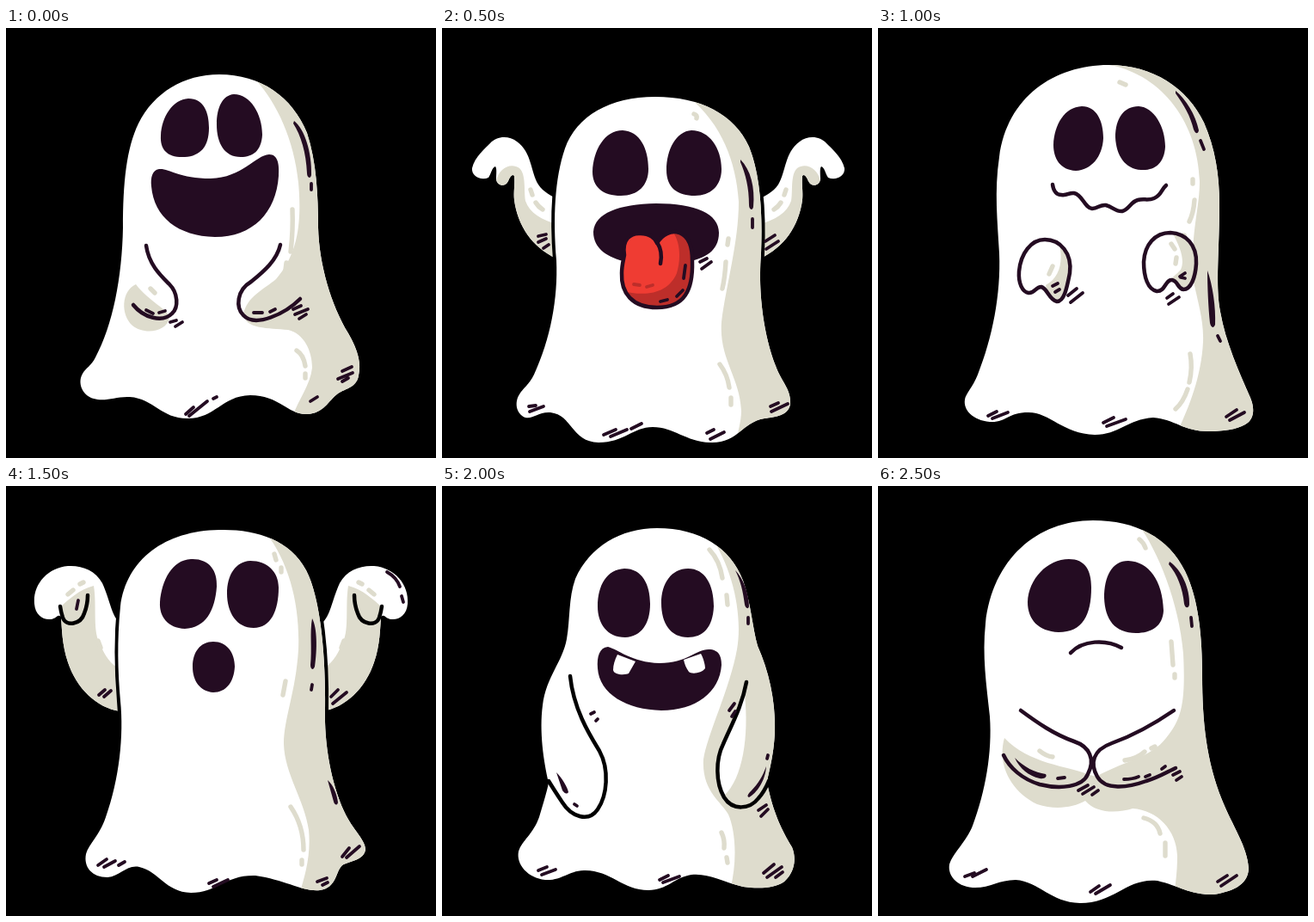
Write an HTML page that moves like this. It is 500 by 500 pixels and loops after 3000 ms.

```html
<!DOCTYPE html>
<html lang="en">
<head>
<meta charset="utf-8">
<title>Ghost moods</title>
<style>
html, body { margin: 0; width: 100%; height: 100%; overflow: hidden; background: #000; }
svg { display: block; width: 100vw; height: 100vh; }
.pose { visibility: hidden; animation: show 3s step-end infinite; animation-delay: calc(var(--i) * .5s - 3s); }
@keyframes show {
  0% { visibility: visible; }
  16.666%, 100% { visibility: hidden; }
}
.w { fill: #fff; }
.s { fill: #dedccd; }
.k { fill: #240c22; }
.d, .l, .a, .h { fill: none; stroke-linecap: round; stroke-linejoin: round; }
.d { stroke: #240c22; stroke-width: 3.8; }
.l { stroke: #dedccd; stroke-width: 5.4; }
.a { stroke: #240c22; stroke-width: 4.5; }
.h { stroke: #000; stroke-width: 4.5; }
.edge { stroke: #000; stroke-width: 8; paint-order: stroke; }
</style>
</head>
<body>
<svg viewBox="0 0 500 500">
<defs>
  <path id="b0" d="M248 54C296 54 333 80 350 122C361 155 363 195 363 232C364 275 378 322 398 355C410 376 413 390 410 404C408 418 395 419 386 425C374 434 370 448 350 449C328 450 318 427 284 427C250 428 244 454 211 454C180 454 172 431 144 429C128 428 116 435 102 431C88 427 83 412 89 402C93 395 99 393 104 383C124 346 135 290 136 232C136 180 140 140 154 111C172 75 207 54 248 54Z"/>
  <path id="b1" d="M248 80C300 80 340 100 357 138C370 170 373 215 371 262C367 310 375 360 388 393C395 412 406 420 405 437C403 451 388 452 375 454C347 459 345 483 312 482C283 481 270 464 245 464C222 464 212 482 182 482C150 481 152 450 126 447C112 446 106 455 97 453C86 449 84 435 90 426C94 419 101 415 107 403C126 362 135 315 133 270C129 220 131 175 143 140C157 102 195 80 248 80Z"/>
  <path id="b2" d="M268 43C320 43 360 70 379 110C392 140 397 170 397 205C397 260 392 300 398 330C404 365 420 400 433 430C438 442 438 455 427 461C417 467 400 469 385 469C355 469 345 455 320 453C290 455 280 473 252 473C215 472 200 447 175 447C150 447 150 459 130 458C110 456 99 444 101 432C102 425 110 418 116 403C133 360 143 310 141 262C139 225 135 190 141 150C150 80 205 43 268 43Z"/>
  <path id="b3" d="M248 51C290 50 330 62 349 98C366 130 372 200 371 260C370 300 378 345 393 378C403 400 418 411 418 423C416 435 400 436 391 441C383 448 385 467 365 470C345 472 325 458 290 453C255 452 245 473 215 473C185 472 178 448 155 443C140 440 133 454 118 455C100 455 90 443 93 428C97 415 108 408 116 385C132 340 137 290 133 250C130 215 129 180 133 140C140 85 185 52 248 51Z"/>
  <path id="b4" d="M250 49C300 49 336 72 350 110C359 135 361 165 367 186C380 215 388 250 387 285C386 315 379 335 378 345C385 380 395 400 407 420C413 435 409 450 398 460C385 469 365 468 350 466C325 460 310 450 290 452C270 455 262 470 240 470C210 470 195 446 165 447C145 448 140 459 120 458C100 456 86 440 89 425C93 412 106 405 113 385C119 365 122 355 124 345C118 320 113 285 117 255C121 222 140 205 145 178C149 155 147 130 155 108C172 70 208 49 250 49Z"/>
  <path id="b5" d="M250 40C300 40 338 60 357 99C373 132 377 175 377 220C377 275 382 320 400 365C412 395 430 420 431 445C430 465 410 472 390 475C365 476 350 465 325 459C290 455 275 485 235 485C200 484 188 460 160 458C140 458 130 468 110 467C90 465 81 452 83 440C88 425 102 415 110 395C125 355 133 310 130 268C126 230 121 198 125 160C133 85 185 40 250 40Z"/>
  <path id="tongue" d="M212 264C209 246 219 238 231 239C241 239 248 244 250 250C256 240 266 235 276 238C288 243 291 255 291 271C292 305 282 325 250 325C221 325 208 308 209 285C209 276 211 270 212 264Z"/>
  <path id="handL" d="M194 246C178 246 166 262 164 283C163 297 168 307 175 308C182 309 183 301 190 301C197 303 199 316 208 318C217 318 220 300 223 285C226 262 212 246 194 246Z"/>
  <path id="handR" d="M340 238C322 238 310 252 309 272C309 290 314 304 324 306C334 307 334 292 342 293C349 294 348 303 355 304C364 304 369 290 370 274C371 252 358 239 340 238Z"/>
  <path id="arm1" d="M133 268C105 255 88 230 84 200C83 190 85 182 84 172C82 169 79 173 77 178C73 186 64 183 63 176C63 170 64 163 62 161C58 162 57 170 54 174C45 178 34 172 35 163C38 150 50 140 56 134C64 125 78 125 87 132C105 145 103 168 112 182C118 191 127 195 136 200Z"/>
  <path id="arm3" d="M133 160C122 150 122 135 112 113C104 98 88 92 72 93C48 95 31 115 33 137C34 150 43 156 52 155C59 154 60 148 64 152C65 165 65 185 72 205C82 235 105 258 133 262Z"/>
  <clipPath id="c0"><use href="#b0"/></clipPath>
  <clipPath id="c1"><use href="#b1"/></clipPath>
  <clipPath id="c2"><use href="#b2"/></clipPath>
  <clipPath id="c3"><use href="#b3"/></clipPath>
  <clipPath id="c4"><use href="#b4"/></clipPath>
  <clipPath id="c5"><use href="#b5"/></clipPath>
  <clipPath id="ct"><use href="#tongue"/></clipPath>
  <clipPath id="cl"><use href="#handL"/></clipPath>
  <clipPath id="cr"><use href="#handR"/></clipPath>
  <clipPath id="ca1"><use href="#arm1"/></clipPath>
  <clipPath id="ca3"><use href="#arm3"/></clipPath>
  <g id="raised">
    <use href="#arm1" class="w"/>
    <path class="s" clip-path="url(#ca1)" d="M63 178C66 163 80 156 90 163C98 170 95 190 97 201C102 215 115 223 136 229V270H63Z"/>
    <path class="l" d="M103 188L105 194M109 203Q112 208 117 211"/>
  </g>
  <g id="curled">
    <use href="#arm3" class="w"/>
    <path class="s" clip-path="url(#ca3)" d="M64 140C72 133 85 120 102 116C106 140 100 170 110 185C115 198 122 207 133 214V265H64Z"/>
    <path class="h" d="M63 140Q64 147 66 153C70 164 87 161 91 148Q95 138 95 127"/>
    <path class="l" d="M72 126L78 121M86 114L90 112M107 180L110 188"/>
  </g>
</defs>

<!-- laughing -->
<g class="pose" style="--i:0">
  <use href="#b0" class="w"/>
  <g class="s" clip-path="url(#c0)">
    <path d="M290 60C315 87 335 130 340 180C344 225 340 262 314 292C300 304 280 312 276 333C278 350 305 349 328 351C346 355 356 375 356 395C354 415 340 432 333 452H430V50Z"/>
    <path d="M151 298C134 306 133 333 147 346C160 357 187 354 190 337C190 328 166 318 151 298Z"/>
  </g>
  <path class="l" d="M333 211Q334 235 331 260M326 273L325 281M338 375Q346 380 348 393M348 402V407M168 303L173 308"/>
  <path class="k" d="M212 82C230 82 236 98 236 116C236 138 226 149 208 150C188 151 179 142 180 125C181 103 194 83 212 82ZM265 77C284 77 298 100 298 124C297 143 287 150 273 150C254 150 245 134 245 112C245 92 252 78 265 77ZM178 164C190 163 200 175 238 175C275 174 290 148 306 147C316 147 318 158 317 172C314 215 287 243 243 243C200 242 172 220 169 184C168 174 170 165 178 164ZM335 108C347 117 356 145 355 171C354 176 350 174 350 169C349 145 343 125 334 111Z"/>
  <path class="a" d="M163 253C166 275 180 288 190 298C200 308 201 325 193 332C182 343 160 337 148 322M319 252C315 270 300 283 285 295C268 305 267 325 276 334C290 349 325 332 342 315"/>
  <path class="d" d="M355 181V188M163 328L171 332M178 331L185 329M191 342L198 340M197 347L205 342M288 331H298M307 330L313 327M334 327L343 323M336 333L351 327M341 338L349 333M209 449L218 441M213 451L234 434M241 431L245 429M391 399L402 394M386 408L403 401M391 411L398 407M354 434L362 429"/>
</g>

<!-- tongue out -->
<g class="pose" style="--i:1">
  <use href="#raised"/>
  <use href="#raised" transform="matrix(-1 0 0 1 503 0)"/>
  <use href="#b1" class="w edge"/>
  <path class="s" clip-path="url(#c1)" d="M288 81C325 112 342 155 345 202C345 250 330 300 325 342C322 385 346 405 348 445C348 460 343 470 342 485H430V80Z"/>
  <path class="l" d="M293 100Q297 101 296 105M333 245L332 252M330 272Q329 290 326 303M323 391Q332 403 334 418M336 430L336 438"/>
  <path class="k" d="M210 119C230 120 240 140 240 164C240 183 228 195 208 195C187 195 175 185 175 167C176 142 189 119 210 119ZM290 119C311 119 325 140 325 164C325 184 312 195 294 195C274 195 261 186 261 165C261 142 272 120 290 119ZM249 204C295 204 322 216 322 238C322 260 305 268 285 272H215C193 267 176 257 176 237C178 215 205 205 249 204ZM347 153C359 165 364 185 362 208C361 213 357 211 357 206C357 185 353 170 347 156Z"/>
  <use href="#tongue" fill="#ef3c33"/>
  <path clip-path="url(#ct)" fill="#bd2e2a" d="M264 232C278 245 278 268 273 285C263 309 236 314 204 304V330H300V232Z"/>
  <use href="#tongue" class="a"/>
  <path class="a" d="M250 249Q257 260 254 274"/>
  <path class="d" style="stroke:#bd2e2a" d="M223 298L230 299M238 301L245 299"/>
  <path class="d" d="M283 276L281 291M280 305L273 312M262 316L254 318M300 272L308 268M302 280L313 272M361 222V232M112 242L121 240M112 249L121 245M118 256L124 252M376 248L387 241M377 257L391 248M101 440L109 439M102 446L118 440M188 473L202 467M196 475L215 467M220 466L232 460M308 471L316 467M312 478L328 470M382 440L391 436M383 446L402 437"/>
</g>

<!-- nervous -->
<g class="pose" style="--i:2">
  <use href="#b2" class="w"/>
  <path class="s" clip-path="url(#c2)" d="M264 42C330 52 372 110 374 178C374 210 364 235 366 290C372 320 379 340 378 365C376 405 362 440 348 470H450V40Z"/>
  <path class="l" d="M281 63L288 66M366 176V181M368 200Q367 215 362 225M356 241L353 249M363 379Q366 395 362 412M360 420Q355 435 346 443"/>
  <use href="#handL" class="w"/>
  <path class="s" clip-path="url(#cl)" d="M210 248C216 270 212 290 195 299L200 322H230V248Z"/>
  <use href="#handL" class="a"/>
  <use href="#handR" class="w"/>
  <path class="s" clip-path="url(#cr)" d="M341 236C352 255 357 270 352 281C346 288 342 288 340 296L350 310H375V236Z"/>
  <use href="#handR" class="a"/>
  <path class="l" d="M203 277L199 286M341 251L345 257M347 267L346 274"/>
  <path class="k" d="M237 91C254 91 262 108 262 128C261 150 248 165 230 166C212 165 204 152 204 136C205 112 217 92 237 91ZM303 91C321 92 334 115 334 138C333 157 322 166 306 165C287 164 277 148 276 127C276 105 286 91 303 91ZM346 73C358 83 369 100 373 119C372 124 369 123 367 118C363 102 356 90 346 76ZM383 282C389 298 393 325 392 345C390 350 387 348 386 343C384 325 383 300 383 282Z"/>
  <path class="a" d="M203 182C204 190 208 194 213 194C221 195 222 191 228 192C238 194 240 209 249 210C256 210 258 205 265 206C273 208 277 214 284 213C292 211 294 202 302 200C309 198 314 201 321 198C330 194 329 188 335 183"/>
  <path class="d" d="M375 131L379 141M395 358L398 364M203 300L209 297M206 307L211 304M221 311L231 303M224 319L238 308M351 289L357 285M352 290L357 291M336 314L343 309M338 321L350 313M128 451L138 446M133 454L151 447M262 459L274 453M266 463L288 455M405 452L417 444M409 456L426 447"/>
</g>

<!-- spooking -->
<g class="pose" style="--i:3">
  <use href="#curled"/>
  <use href="#curled" transform="matrix(-1 0 0 1 500 0)"/>
  <use href="#b3" class="w edge"/>
  <path class="s" clip-path="url(#c3)" d="M302 54C330 90 342 140 340 190C337 240 323 270 323 300C324 335 347 365 352 400C355 430 347 455 341 475H430V54Z"/>
  <path class="l" d="M312 79L314 86M320 95V100M325 227L322 243M331 373Q346 395 346 423M344 435V440"/>
  <path class="k" d="M215 85C236 84 246 98 245 117C243 145 232 165 208 166C188 165 178 152 179 135C181 110 193 86 215 85ZM284 87C304 87 317 100 317 118C317 145 308 165 288 165C268 165 257 147 257 125C257 103 267 88 284 87ZM241 181C257 181 266 194 266 210C265 228 256 240 241 240C226 239 217 227 217 210C217 193 226 181 241 181ZM356 154C362 165 362 190 359 210C357 215 354 213 354 208C356 190 353 170 356 154ZM374 342C380 347 385 358 386 368C385 372 382 371 381 367Z"/>
  <path class="d" d="M356 231L355 237M84 133L82 143M443 100Q454 106 458 117M460 128L462 135M108 243L115 237M114 245L122 238M378 245L386 237M380 253L396 240M107 441L117 434M114 443L127 436M131 441L138 437M236 462L245 458M241 466L258 458M391 431L399 421M396 432L411 419M362 460L373 456M368 464L374 461"/>
</g>

<!-- grinning -->
<g class="pose" style="--i:4">
  <use href="#b4" class="w"/>
  <path class="s" clip-path="url(#c4)" d="M312 58C338 95 350 150 343 190C335 235 308 290 304 318C302 355 325 367 333 382C341 400 344 435 335 470H430V50Z"/>
  <path class="w" d="M352 243C345 265 335 285 327 300C318 318 318 343 328 360C350 340 357 290 352 243Z"/>
  <path class="l" d="M311 74Q323 87 326 107M331 127L332 138M325 403Q329 411 328 421M331 432L332 438"/>
  <path class="k" d="M212 96C233 96 242 115 242 137C242 160 232 175 213 176C192 176 181 160 181 140C181 115 192 97 212 96ZM286 96C306 96 316 115 316 140C315 165 303 176 286 176C266 176 255 160 255 136C255 113 267 96 286 96ZM193 187C205 190 220 205 253 206C285 206 295 190 310 190C322 190 325 198 325 208C323 240 295 261 255 261C215 260 183 242 181 212C180 198 183 188 193 187ZM341 98C350 107 357 125 357 140C356 144 353 142 352 138C350 122 347 110 341 98ZM133 333C139 339 146 350 147 356C145 359 142 357 140 354ZM377 326C376 343 366 357 357 362C354 361 356 358 359 355C368 346 373 337 377 326Z"/>
  <path class="w" d="M204 196L225 204L217 218C213 220 200 220 199 214C199 208 201 202 204 196ZM281 202L301 195C304 200 306 208 306 212C302 218 290 219 287 216C284 212 282 207 281 202Z"/>
  <path class="h" d="M149 221C153 260 172 290 183 308C195 330 192 360 181 376C170 392 150 384 140 368C132 356 127 348 124 343M354 228C349 255 338 275 327 300C318 318 318 345 328 362C338 378 358 376 368 363C375 355 377 350 380 343"/>
  <path class="d" d="M356 153V160M173 265L177 263M179 273L181 271M154 370L157 372M334 261L340 253M337 268L341 262M378 317L379 313M368 377L377 371M371 384L379 376M112 447L122 443M116 452L132 446M253 458L263 453M257 461L276 454M374 450L386 440M378 455L395 443M388 455L396 449"/>
</g>

<!-- sulking -->
<g class="pose" style="--i:5">
  <use href="#b5" class="w"/>
  <path class="s" clip-path="url(#c5)" d="M303 45C325 75 350 135 355 195C358 255 352 272 335 293C318 316 280 322 254 338L243 335C222 326 175 323 147 293C138 325 155 355 185 370C206 377 227 374 241 366C255 382 280 380 296 375C325 377 347 400 348 430C348 450 346 460 344 480H450V44Z"/>
  <path class="l" d="M304 62Q309 66 311 72M341 181L343 208M345 219V223M188 308Q195 314 203 315M287 319Q302 317 310 309M318 305L322 303M309 386Q325 390 328 404M334 415V430"/>
  <path class="k" d="M222 85C241 85 248 98 248 118C248 150 238 170 210 170C186 169 174 155 174 135C175 108 197 85 222 85ZM291 87C315 88 331 110 332 145C331 163 318 171 300 171C275 171 264 155 263 130C263 105 272 87 291 87ZM339 88C353 97 363 120 362 138C361 143 357 142 356 137C354 118 348 103 338 91ZM159 316C170 327 182 333 195 335C197 338 194 341 188 340C175 337 165 329 159 316Z"/>
  <path class="a" d="M224 194C238 179 265 178 283 188M166 261C185 275 205 289 228 297C246 303 253 318 244 335C238 350 212 353 188 347C168 341 153 328 146 313M344 261C325 274 300 289 272 299C250 307 246 322 255 338C264 354 290 351 312 343C326 339 337 332 346 328"/>
  <path class="d" d="M364 153L365 163M209 340L217 339M286 341Q296 341 303 338M311 338L316 336M330 329L334 326M233 354L244 348M238 358L251 350M249 359L256 354M343 336L351 332M347 342L353 338M101 454L112 450L110 454L126 446M247 472L257 465M253 474L270 464M395 460L406 453M399 465L417 453"/>
</g>
</svg>
</body>
</html>
```
